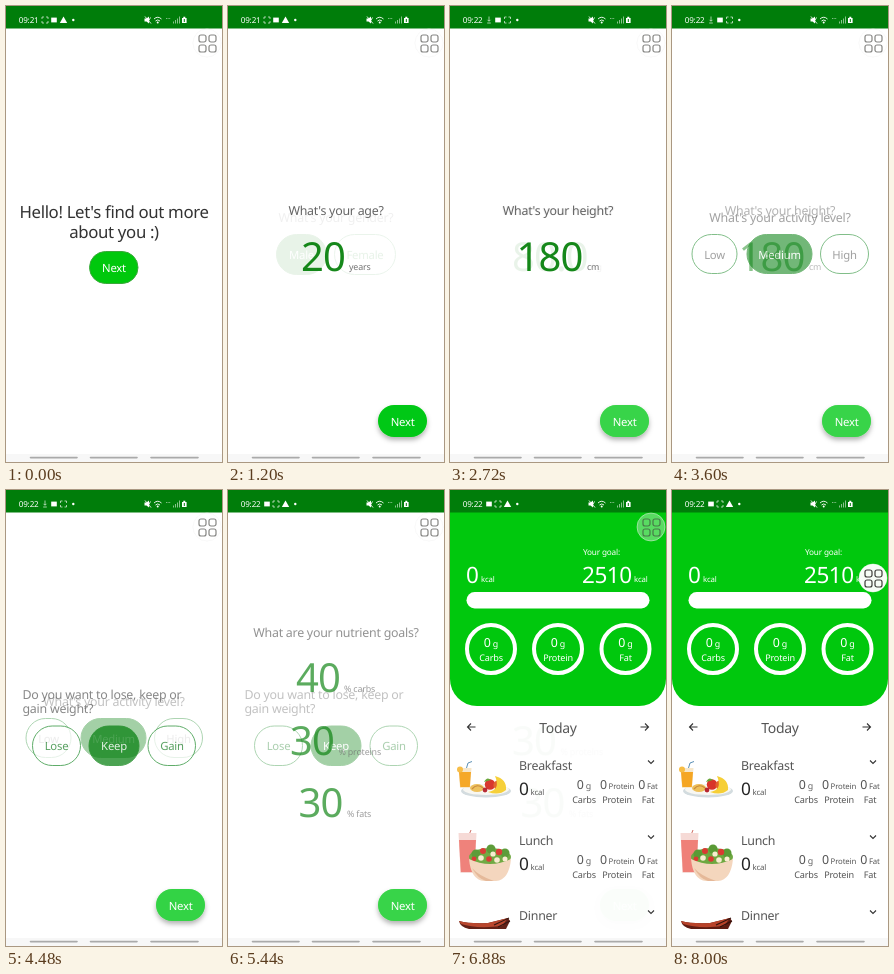
Animation, 216 px wide and 456 px high, one loop 8.08 s. Source, as an HTML page:

```html
<!DOCTYPE html>
<html lang="en">
<head>
<meta charset="utf-8">
<title>Diet setup</title>
<style>
html, body { margin: 0; width: 100%; height: 100%; overflow: hidden; background: #fff; }
svg { display: block; }
#stage { width: 216px; height: 456px; }
text, tspan { letter-spacing: -.02em; text-rendering: geometricPrecision; }
text { font-family: "Noto Sans", "Open Sans", sans-serif; font-size: 12.4px; fill: #555; }
.mid text, .mid { text-anchor: middle; }
.label, .label text { font-size: 11.3px; }
.hi { font-size: 16.8px; fill: #333; }
.big { font-size: 40px; fill: #007d05; letter-spacing: -.022em; }
.unit { font-size: 8.9px; fill: #666; }
.white text, text.white, .white tspan { fill: #fff; }
.pill { fill: #fff; stroke: #1c8a2a; stroke-width: 1; }
.on { fill: #007d0a; stroke: #007d0a; }
.small { font-size: 7.8px; }
.sub { font-size: 9.1px; }
.line { fill: none; stroke: #333; stroke-width: 1.1; }

.page, .anim { animation: 8080ms linear infinite both; }
#hello { animation-name: hello; }
#gender { animation-name: gender; }
#age { animation-name: age; }
#weight { animation-name: weight; }
#height { animation-name: height; }
#activity { animation-name: activity; }
#aim { animation-name: aim; }
#nutrients { animation-name: nutrients; }
#diary { animation-name: diary; }
#header { animation-name: header; }
#next { animation-name: next; }
#press { animation-name: press; }
#tap { animation-name: tap; }
#fab { animation-name: drag; }
#disc { animation-name: solid; }
#grid { animation-name: darken; }
.t1 { animation-name: t1; animation-timing-function: step-end; }
.t2 { animation-name: t2; animation-timing-function: step-end; }
.i2 { animation-name: i2; animation-timing-function: step-end; }
.i3 { animation-name: i3; animation-timing-function: step-end; }
.dot { animation-name: dot; animation-timing-function: step-end; }

@keyframes hello { 0%, 4.95% { opacity: 1 } 7.92%, 100% { opacity: 0 } }
@keyframes gender { 0%, 4.95% { opacity: 0 } 7.92%, 12.38% { opacity: 1 } 15.1%, 100% { opacity: 0 } }
@keyframes age { 0%, 12.38% { opacity: 0 } 15.1%, 22.77% { opacity: 1 } 25.5%, 100% { opacity: 0 } }
@keyframes weight { 0%, 22.77% { opacity: 0 } 25.5%, 31.19% { opacity: 1 } 33.91%, 100% { opacity: 0 } }
@keyframes height { 0%, 31.19% { opacity: 0 } 33.91%, 43.07% { opacity: 1 } 45.79%, 100% { opacity: 0 } }
@keyframes activity { 0%, 43.07% { opacity: 0 } 45.79%, 53.71% { opacity: 1 } 56.44%, 100% { opacity: 0 } }
@keyframes aim { 0%, 53.71% { opacity: 0 } 56.2%, 65.59% { opacity: 1 } 68.32%, 100% { opacity: 0 } }
@keyframes nutrients { 0%, 65.59% { opacity: 0 } 68.32%, 85.4% { opacity: 1 } 85.41%, 100% { opacity: 0 } }
@keyframes diary { 0%, 83.91% { opacity: 0 } 85.19%, 100% { opacity: 1 } }
@keyframes header { 0%, 83.91% { opacity: 0 } 85.1%, 100% { opacity: 1 } }
@keyframes next { 0%, 4.95% { opacity: 0 } 7.92%, 85.4% { opacity: 1 } 85.41%, 100% { opacity: 0 } }
@keyframes tap { 0%, 2.5% { opacity: 0 } 4%, 8% { opacity: .22 } 9%, 100% { opacity: 0 } }
@keyframes press {
  0%, 21.2% { opacity: 0 } 22.5%, 26% { opacity: .22 } 28%, 29.6% { opacity: 0 }
  30.9%, 34.5% { opacity: .22 } 36.5%, 41.5% { opacity: 0 } 42.8%, 46% { opacity: .22 }
  48%, 52% { opacity: 0 } 53.3%, 56.6% { opacity: .2 } 58.6%, 64% { opacity: 0 }
  65.3%, 68.5% { opacity: .22 } 70.5%, 80.5% { opacity: 0 } 81.8%, 100% { opacity: .22 }
}
@keyframes drag {
  0%, 90.35% { transform: translate(201px, 37px); animation-timing-function: ease-in-out }
  95.3%, 100% { transform: translate(201px, 88px) }
}
@keyframes solid { 0%, 89.1% { opacity: .35 } 90.35%, 100% { opacity: .97 } }
@keyframes darken { 0%, 89.1% { opacity: .62 } 90.35%, 100% { opacity: 1 } }
@keyframes t1 { 0% { opacity: 1 } 24.75%, 100% { opacity: 0 } }
@keyframes t2 { 0% { opacity: 0 } 24.75%, 100% { opacity: 1 } }
@keyframes i2 { 0% { opacity: 0 } 24.75% { opacity: 1 } 64.36%, 100% { opacity: 0 } }
@keyframes i3 { 0% { opacity: 0 } 64.36%, 100% { opacity: 1 } }
@keyframes dot { 0% { opacity: 0 } 12.38% { opacity: 1 } 24.75% { opacity: 0 } 64.36% { opacity: 1 } 94%, 100% { opacity: 0 } }
</style>
</head>
<body>
<svg id="stage" viewBox="0 0 216 456">
  <defs>
    <filter id="shade" x="-30%" y="-30%" width="160%" height="190%">
      <feDropShadow dx="0" dy="3" stdDeviation="2.6" flood-opacity=".3"/>
    </filter>
    <clipPath id="body"><rect width="216" height="448"/></clipPath>
    <g id="scan">
      <path d="M-3 -1V-3H-1M1 -3H3V-1M3 1V3H1M-1 3H-3V1" fill="none" stroke="#fff" stroke-width=".8" opacity=".8"/>
      <path class="anim dot" d="M-1.5 -1.5L1.5 1.5M1.5 -1.5L-1.5 1.5" stroke="#fff" stroke-width=".8"/>
    </g>
    <path id="alert" d="M0 -3.5L3.7 3H-3.7Z" fill="#fff"/>
    <rect id="mail" x="-2.8" y="-2.4" width="5.6" height="4.8" fill="#fff"/>
    <g id="macros" class="mid">
      <text x="134" y="299">0<tspan class="unit"> g</tspan></text>
      <text x="167" y="299">0<tspan class="small"> Protein</tspan></text>
      <text x="198" y="299">0<tspan class="small"> Fat</tspan></text>
      <text class="sub" x="134" y="313">Carbs</text>
      <text class="sub" x="167" y="313">Protein</text>
      <text class="sub" x="198" y="313">Fat</text>
    </g>
    <g id="meal">
      <text x="69" y="305" style="font-size:17.3px;fill:#222">0</text>
      <text class="small" x="80.5" y="305">kcal</text>
      <path class="line" d="M198 270.5L201 273.5L204 270.5"/>
      <use href="#macros"/>
    </g>
  </defs>

  <rect width="216" height="456" fill="#fff"/>

  <g id="hello" class="page mid">
    <text class="hi" x="108" y="211.5">Hello! Let's find out more</text>
    <text class="hi" x="108" y="232">about you :)</text>
    <rect x="83.5" y="245.5" width="48.5" height="32" rx="16" fill="#00c80d" stroke="#3aa83a"/>
    <rect id="tap" class="anim" x="83.5" y="245.5" width="48.5" height="32" rx="16" fill="#fff"/>
    <text class="label white" x="108" y="265.7">Next</text>
  </g>

  <g id="gender" class="page mid">
    <text x="108" y="215.5">What's your gender?</text>
    <rect class="pill on" x="48.5" y="228.5" width="50" height="40" rx="20"/>
    <rect class="pill" x="106.5" y="228.5" width="61" height="40" rx="20"/>
    <text class="label white" x="73.5" y="253">Male</text>
    <text class="label" x="137" y="253" style="fill:#007d0a">Female</text>
  </g>

  <g id="age" class="page">
    <text class="mid" x="108" y="209">What's your age?</text>
    <text class="big" x="73" y="265">20</text>
    <text class="unit" x="121" y="264">years</text>
  </g>

  <g id="weight" class="page">
    <text class="mid" x="108" y="209">What's your weight?</text>
    <text class="big" x="62" y="265">80.0</text>
    <text class="unit" x="142" y="264">kg</text>
  </g>

  <g id="height" class="page">
    <text class="mid" x="108" y="209">What's your height?</text>
    <text class="big" x="66.5" y="265">180</text>
    <text class="unit" x="137" y="264">cm</text>
  </g>

  <g id="activity" class="page mid">
    <text x="108" y="216">What's your activity level?</text>
    <rect class="pill" x="20" y="228.5" width="45" height="39" rx="19.5"/>
    <rect class="pill on" x="75" y="228.5" width="65" height="39" rx="19.5"/>
    <rect class="pill" x="148.5" y="228.5" width="48" height="39" rx="19.5"/>
    <g class="label">
      <text x="42.5" y="252.5">Low</text>
      <text class="white" x="107.5" y="252.5">Medium</text>
      <text x="172.5" y="252.5">High</text>
    </g>
  </g>

  <g id="aim" class="page">
    <text x="16.5" y="208.5">Do you want to lose, keep or</text>
    <text x="16.5" y="222.5">gain weight?</text>
    <rect class="pill" x="26.5" y="236" width="48" height="39.5" rx="19.7"/>
    <rect class="pill on" x="83" y="236" width="50" height="39.5" rx="19.7"/>
    <rect class="pill" x="142" y="236" width="47.5" height="39.5" rx="19.7"/>
    <g class="label mid">
      <text x="50.5" y="260" style="fill:#147a20">Lose</text>
      <text class="white" x="108" y="260">Keep</text>
      <text x="166" y="260" style="fill:#147a20">Gain</text>
    </g>
  </g>

  <g id="nutrients" class="page">
    <text class="mid" x="108" y="146.5">What are your nutrient goals?</text>
    <text class="big" x="68" y="202">40</text><text class="unit" x="116" y="202">% carbs</text>
    <text class="big" x="62" y="264.5">30</text><text class="unit" x="110.5" y="264.5">% proteins</text>
    <text class="big" x="70.5" y="327">30</text><text class="unit" x="119" y="326.5">% fats</text>
  </g>

  <g id="next" class="anim">
    <rect x="150" y="399" width="49" height="32" rx="16" fill="#00c814" filter="url(#shade)"/>
    <rect id="press" class="anim" x="150" y="399" width="49" height="32" rx="16" fill="#fff"/>
    <text class="label white mid" x="174.7" y="419.5">Next</text>
  </g>

  <g id="diary" class="page" clip-path="url(#body)">
    <rect width="216" height="456" fill="#fff"/>
    <text class="mid" x="108" y="242.5" style="font-size:14px">Today</text>
    <path class="line" d="M25.5 237H17.5M21 233.5L17.5 237L21 240.5M190.5 237H198.5M195 233.5L198.5 237L195 240.5"/>
    <text x="69" y="279.5">Breakfast</text>
    <text x="69" y="354.5">Lunch</text>
    <text x="69" y="429.5">Dinner</text>
    <use href="#meal"/>
    <use href="#meal" y="75"/>
    <path class="line" d="M198 420.5L201 423.5L204 420.5"/>

    <!-- breakfast -->
    <ellipse cx="36" cy="301" rx="25" ry="6.5" fill="#d3dcdf"/>
    <ellipse cx="36" cy="299.5" rx="23" ry="5.5" fill="#f8f7f2"/>
    <path d="M15 283L18 273L22 271.5" fill="none" stroke="#5b8fb5"/>
    <path d="M8.5 278H21.5L20 298H10Z" fill="#f6e7cb"/>
    <path d="M9 282H21L19.8 297H10.3Z" fill="#f5a623"/>
    <circle cx="10" cy="279.5" r="3" fill="#f7bd45"/>
    <ellipse cx="27" cy="298" rx="7" ry="4" fill="#eec05a"/>
    <path d="M22 299Q27 293 33 298" fill="none" stroke="#c98a3a" stroke-width="1.2"/>
    <circle cx="40" cy="294.5" r="5.2" fill="#d8342a"/>
    <circle cx="48" cy="295" r="4.6" fill="#e2632b"/>
    <path d="M45 286Q57 289 56 300Q49 306 38 302Q51 300 45 286Z" fill="#f6cf36"/>
    <path d="M34 292Q37 286 41 290Z" fill="#66a536"/>
    <circle cx="35" cy="300" r="2.4" fill="#b72630"/>

    <!-- lunch -->
    <path d="M17 350L21 340" stroke="#cf6a60"/>
    <path d="M8.5 343H26.5L24.5 383H10.5Z" fill="#f6dad6"/>
    <path d="M9 350H26L24.2 382H10.8Z" fill="#ef8078"/>
    <ellipse cx="40" cy="367" rx="21" ry="9" fill="#6ea840"/>
    <g fill="#5a9a35"><circle cx="26" cy="364" r="4.5"/><circle cx="41" cy="359" r="4.5"/><circle cx="55" cy="363" r="4.5"/></g>
    <g fill="#d93a32"><circle cx="33" cy="361" r="3"/><circle cx="49" cy="362" r="3.2"/><circle cx="39" cy="369" r="2.8"/><circle cx="24" cy="369" r="2.4"/></g>
    <g fill="#f8ecd0"><circle cx="31" cy="368" r="2.8"/><circle cx="43" cy="364" r="2.6"/><circle cx="47" cy="370" r="2.8"/><circle cx="55" cy="369" r="2.5"/></g>
    <path d="M19 369Q40 379 61 369Q59 390 46 391H34Q21 390 19 369Z" fill="#f4d6bd"/>
    <path d="M22 378Q28 389 36 391H44Q29 386 22 378Z" fill="#e5b898"/>

    <!-- dinner -->
    <path d="M9 431Q20 434 38 433L58 428L60 431L56 439H19Q10 437 9 431Z" fill="#5f1c12"/>
    <path d="M9 431Q20 434 38 433L58 428L52 436Q26 439 11 434Z" fill="#b8432a"/>
    <path d="M44 435L59 428M48 437L60 431" stroke="#33130e" stroke-width="1.2"/>
  </g>

  <g id="header" class="page">
    <path d="M0 22H216V189A27 27 0 0 1 189 216H27A27 27 0 0 1 0 189Z" fill="#00c80d"/>
    <g class="white">
      <text x="16" y="92.5" style="font-size:22.5px">0</text>
      <text class="small" x="31" y="92" style="font-weight:500">kcal</text>
      <text x="133" y="65" style="font-size:8.2px;font-weight:500">Your goal:</text>
      <text x="132" y="92.5" style="font-size:22.5px">2510</text>
      <text class="small" x="184" y="92" style="font-weight:500">kcal</text>
    </g>
    <rect x="16.5" y="102" width="183" height="16.5" rx="8.2" fill="#fff"/>
    <g fill="none" stroke="#fff" stroke-width="4">
      <circle cx="41" cy="159" r="24"/><circle cx="108" cy="159" r="24"/><circle cx="175.5" cy="159" r="24"/>
    </g>
    <g class="white mid">
      <text x="41" y="157">0<tspan class="unit"> g</tspan></text>
      <text x="108" y="157">0<tspan class="unit"> g</tspan></text>
      <text x="175.5" y="157">0<tspan class="unit"> g</tspan></text>
      <text class="sub" x="41" y="170.5">Carbs</text>
      <text class="sub" x="108" y="170.5">Protein</text>
      <text class="sub" x="175.5" y="170.5">Fat</text>
    </g>
  </g>

  <rect width="216" height="22.5" fill="#007d0a"/>
  <g class="white">
    <text class="anim t1" x="12.7" y="16.7" style="font-size:8.1px">09:21</text>
    <text class="anim t2" x="12.7" y="16.7" style="font-size:8.1px">09:22</text>
  </g>
  <g class="anim t1">
    <use href="#scan" x="39" y="14"/><use href="#mail" x="48" y="14"/><use href="#alert" x="57.5" y="14"/>
  </g>
  <g class="anim i2">
    <path d="M39 10.5V15M37.5 13.8L39 15.3L40.5 13.8M37.2 17H40.8" stroke="#fff" fill="none" stroke-width=".8" opacity=".8"/>
    <use href="#mail" x="48" y="14"/><use href="#scan" x="57.5" y="14"/>
  </g>
  <g class="anim i3">
    <use href="#mail" x="39" y="14"/><use href="#scan" x="48" y="14"/><use href="#alert" x="57.5" y="14"/>
  </g>
  <circle cx="67.3" cy="14" r="1.2" fill="#fff"/>
  <path d="M138.5 12.5H140.5L143 10.5V17.5L140.5 15.5H138.5Z" fill="#fff"/>
  <path d="M139 10.5L145 17.5M144.5 11.5L142 16M148 13Q151.7 9.5 155.5 13M149.5 15Q151.7 12.9 154 15" fill="none" stroke="#fff" stroke-width=".9"/>
  <circle cx="151.7" cy="16.5" r="1" fill="#fff"/>
  <path d="M160 12.5H164.5" stroke="#fff" stroke-width="1.2" stroke-dasharray="1 .6" opacity=".5"/>
  <path d="M167.5 17.5V15.5M169.5 17.5V14M171.5 17.5V12.5M173.5 17.5V10.5" stroke="#fff" stroke-width=".9" opacity=".6"/>
  <path d="M176 12H177.3V10.8H179.3V12H180.6V17H176Z" fill="#fff"/>
  <path d="M178.3 13V16" stroke="#007d0a" stroke-width="1"/>

  <rect y="448" width="216" height="8" fill="#f7f7f7"/>
  <path d="M24.5 451.6H71M84.5 451.6H131M145 451.6H192" stroke="#aaa" stroke-width="1.6" stroke-linecap="round"/>

  <g id="fab" class="anim">
    <circle r="14" fill="none" stroke="#eee" stroke-width=".8" opacity=".6"/>
    <circle id="disc" class="anim" r="14" fill="#fff"/>
    <g id="grid" class="anim" fill="none" stroke="#3c3c38" stroke-width="1.2">
      <rect x="-8" y="-8" width="7" height="7" rx="2"/><rect x="2" y="-8" width="7" height="7" rx="2"/>
      <rect x="-8" y="2" width="7" height="7" rx="2"/><rect x="2" y="2" width="7" height="7" rx="2"/>
    </g>
  </g>
</svg>
</body>
</html>
```
